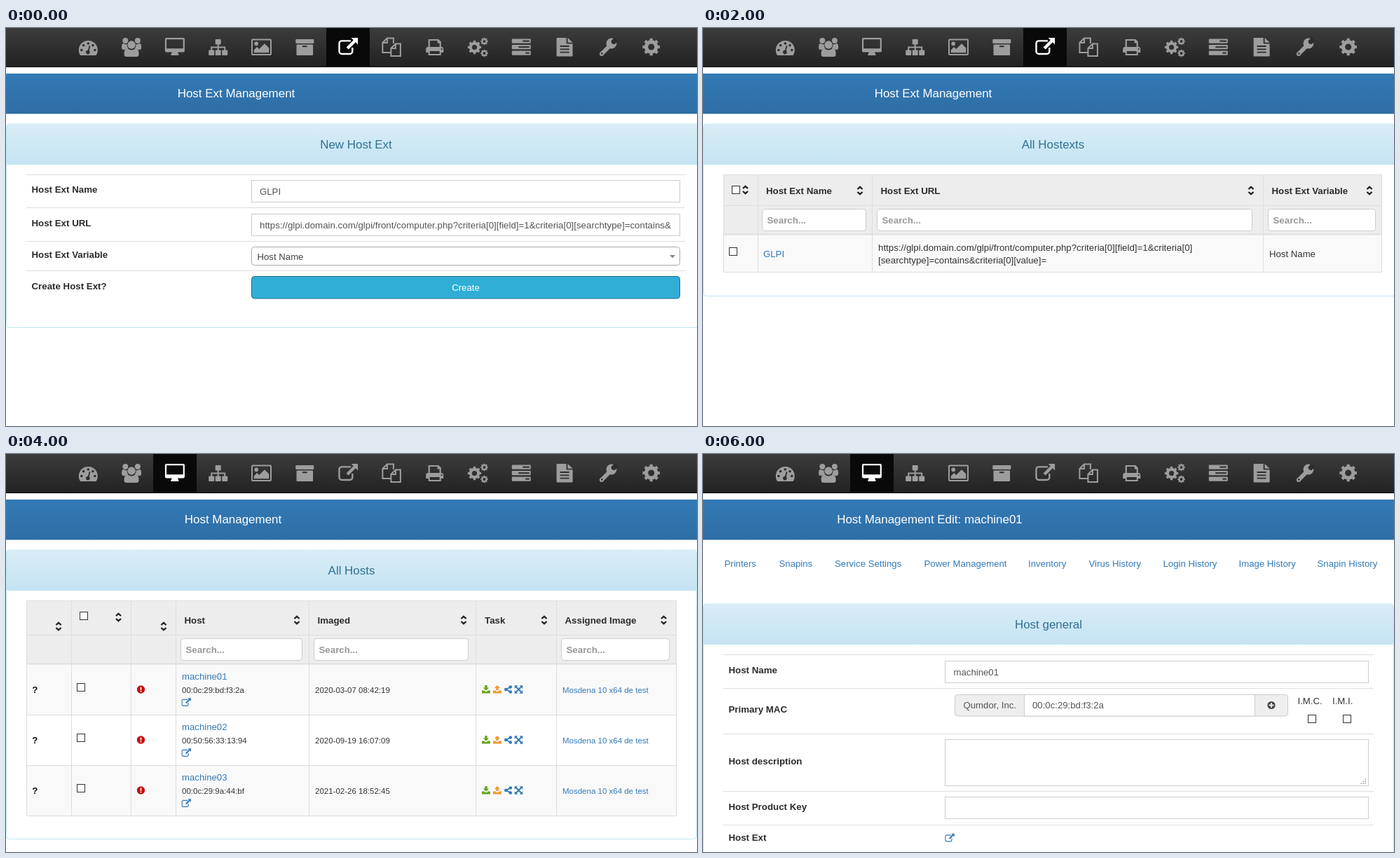
An HTML page that plays this animation: 986x568 px, repeating every 8000 ms.

```html
<!DOCTYPE html>
<html lang="en">
<head>
<meta charset="utf-8">
<title>Host Ext</title>
<style>
html, body { margin: 0; width: 100%; height: 100%; overflow: hidden; background: #fff; }
svg { display: block; width: 986px; height: 568px; font: 13.2px "Liberation Sans", Arial, sans-serif; }
</style>
</head>
<body>
<svg id="stage" viewBox="0 0 986 568"></svg>
<script>
const BLUE = '#337ab7', INK = '#333', DARK = '#2d2d2d';
const URL_HEAD = 'https://glpi.domain.com/glpi/front/computer.php?criteria[0][field]=1&criteria[0]';

const rect = (x, y, w, h, fill, stroke = 'none', r = 0) =>
  `<rect x="${x}" y="${y}" width="${w}" height="${h}" rx="${r}" fill="${fill}" stroke="${stroke}"/>`;
const path = (d, attrs = 'fill="currentColor"') => `<path d="${d}" ${attrs}/>`;
const line = (d, w = 2, color = 'currentColor') =>
  path(d, `fill="none" stroke="${color}" stroke-width="${w}"`);
const dot = (x, y, r, fill = 'currentColor') => `<circle cx="${x}" cy="${y}" r="${r}" fill="${fill}"/>`;
const text = (x, y, s, fill = INK, attrs = '') =>
  `<text x="${x}" y="${y}" fill="${fill}" ${attrs}>${s.replace(/&/g, '&amp;')}</text>`;
const bold = (x, y, s, fill = '#2b2b2b') => text(x, y, s, fill, 'font-weight="700" font-size="13.3"');
const small = (x, y, s, fill = INK) => text(x, y, s, fill, 'font-size="11.5"');
const title = (x, y, s, fill) => text(x, y, s, fill, 'font-size="16.95" text-anchor="middle"');
const place = (x, y, color, body, scale = 1) =>
  `<g transform="translate(${x} ${y}) scale(${scale})" color="${color}">${body}</g>`;
const hLines = (x1, x2, ys, c = '#ddd') => ys.map(y => line(`M${x1} ${y}H${x2}`, 1, c)).join('');
const vLines = (xs, y1, y2, c = '#ddd') => xs.map(x => line(`M${x} ${y1}V${y2}`, 1, c)).join('');

const input = (x, y, w, h = 31, r = 0) => rect(x, y, w, h, '#fff', '#ccc', r);
const search = (x, y, w) => input(x, y, w, 31, 4) + bold(x + 7, y + 20.5, 'Search...', '#999');
const check = (x, y) => rect(x, y, 11, 11, '#fff', '#333');
const sorter = (x, y) => place(x, y, '#222', line('M-3.6-2L0-5.2 3.6-2M-3.6 2L0 5.2 3.6 2', 2.3));

const gear = (x, y, r) => {
  const ring = (k, w, extra = '') =>
    `<circle cx="${x}" cy="${y}" r="${r * k}" fill="none" stroke="currentColor" stroke-width="${r * w}" ${extra}/>`;
  return ring(.59, .44) + ring(.88, .26, 'pathLength="16" stroke-dasharray="1" stroke-dashoffset=".5"');
};
const box = (x, y, w, h, r = 1) => rect(x, y, w, h, 'currentColor', 'none', r);

const link =
  line('M4-8.6H-9a3.6 3.6 0 0 0-3.6 3.6V6.4A3.6 3.6 0 0 0-9 10H2.6a3.6 3.6 0 0 0 3.6-3.6V1', 2.4) +
  path('M4.5-13H14V-3.5L10.8-6.7 .6 3.5-2.5.4 7.7-9.8z');

const icons = [
  path('M-11.2 12A13.5 13.5 0 1 1 11.2 12Z') +
    [[-9.5, 4.5], [-6.7, -2.3], [0, -5], [6.7, -2.3], [9.5, 4.5]].map(p => dot(...p, 1.8, DARK)).join('') +
    line('M0 7L2.2-1.6', 1.8, DARK) + dot(-.4, 7.6, 2.8, DARK),
  [-1, 1].map(s => `<g transform="scale(${s} 1)">${dot(8.8, -9, 4)}${
    path('M14 1c0-4.500-.9-6-2.500-6q-3 2-5.500 1 0 4-2 6 4 0 6 2h1.500q2.500 0 2.500-3z')}</g>`).join('') +
    dot(0, -3, 6.6, DARK) + dot(0, -3, 5.7) +
    path('M-7 14q-3.500 0-3.500-3.500c0-6 2-8.500 4.500-8.500 4 3.300 8 3.300 12 0 2.500 0 4.500 2.500 4.500 8.500q0 3.500-3.500 3.500z'),
  path('M-12-13H12a2 2 0 0 1 2 2V5.500a2 2 0 0 1-2 2H4l1.500 3V12h-11v-1.500l1.500-3h-8a2 2 0 0 1-2-2V-11a2 2 0 0 1 2-2zM-11.800-10.800V2.200H11.800V-10.800z',
    'fill="currentColor" fill-rule="evenodd"'),
  box(-4, -11, 8, 7.5) + [-13.5, -4, 5.5].map(x => box(x, 4.5, 8, 7.5)).join('') +
    line('M0-4V5M-9.500 5V.5H9.500V5'),
  line('M-12.500-10.500H12.500a1 1 0 0 1 1 1V10a1 1 0 0 1-1 1H-12.500a1 1 0 0 1-1-1V-9.500a1 1 0 0 1 1-1z') +
    dot(-7.3, -4.6, 2.8) + path('M-10.800 8.300V4.500l4.500-4.500 3 3L4.500-4.800 10.800 1.500V8.300z'),
  box(-13, -11, 26, 6) + box(-11.8, -3.6, 23.6, 15.6) + rect(-3.5, -1.8, 7, 2, DARK, 'none', 1),
  link,
  line('M-1 8H-12.500V-6L-6-12.500H3V-5M-6-12.500V-6H-12.500M-.5 2L6-4.500H13V13H-.5zM6-4.500V2H-.5'),
  line('M-8 1V-10H5l3 3V1M5-10V-6.500H8', 2.2) + path('M-12.500 8V3a3 3 0 0 1 3-3H9.500a3 3 0 0 1 3 3V8z') +
    `<rect x="-8" y="5" width="16" height="6" fill="${DARK}" stroke="currentColor" stroke-width="2"/>` + dot(10, 3, 1.1, DARK),
  gear(-5, .5, 9.6) + gear(9, -8, 5.3) + gear(9, 9, 5.3),
  [-11.5, -3, 5.5].map((y, i) => box(-13.5, y, 27, 6.3) +
    line(`M${[2, -4, 6][i]} ${y + 3.15}H11.5`, 2, DARK)).join(''),
  path('M-10.500-13H2.500V-5.500a1 1 0 0 0 1 1H11.500V12.500a1 1 0 0 1-1 1H-10.500a1 1 0 0 1-1-1V-12a1 1 0 0 1 1-1zM4.500-13L11.500-6.300H4.500z') +
    line('M-6.500-1H6.500M-6.500 3.300H6.500M-6.500 7.600H6.500', 1.8, DARK),
  line('M-9 10L3-2', 6) + dot(-9, 10, 3) + dot(5, -5, 7.4) +
    path('M4.500-8.500L10-14 15-9 9.500-3.800 5.500-4.800z', `fill="${DARK}"`) + dot(-8.6, 9.4, 1.3, DARK),
  gear(0, 0, 12.2)
];

function page(active, heading, x) {
  const nav = icons.map((icon, i) => {
    const cx = 117.3 + 61.8 * i, on = i === active;
    return (on ? rect(Math.round(cx - 31), 0, 62, 55, '#090909') : '') +
      place(cx, 27, on ? '#fff' : '#9d9d9d', icon);
  }).join('');
  return rect(0, 0, 986, 55, 'url(#nav)') + nav + rect(0, 55, 986, 1, '#080808') +
    rect(0, 65, 986, 57.5, 'url(#bar)') + title(x, 99, heading, '#fff');
}

const panel = (y, bottom, w, cx, name) =>
  rect(.5, y, w, bottom - y, '#fff', '#bce8f1', 4) + rect(1, y + .5, w - 1, 57, 'url(#head)', 'none', 3) +
  hLines(1, w, [y + 57.5], '#bce8f1') + title(cx, y + 34.7, name, '#31708f');

function grid(xs, ys) {
  const [l, r, t, b] = [xs[0], xs.at(-1), ys[0], ys.at(-1)];
  let s = rect(l, t, r - l, ys[2] - t, '#ededed');
  for (let i = 2; i < ys.length - 1; i += 2) s += rect(l, ys[i], r - l, ys[i + 1] - ys[i], '#f9f9f9');
  return s + hLines(l, r, ys) + vLines(xs, t, b) + hLines(l, r, [ys[2] - 1]);
}

function newExt() {
  return page(6, 'Host Ext Management', 328.5) + panel(137, 427.5, 1000, 499.5, 'New Host Ext') +
    hLines(29, 969, [209.5, 256.5, 304.5, 346.5]) +
    bold(36.5, 235, 'Host Ext Name') + bold(36.5, 283, 'Host Ext URL') +
    bold(36.5, 328, 'Host Ext Variable') + bold(36.5, 373, 'Create Host Ext?') +
    input(350.5, 217.5, 611) + text(362, 238, 'GLPI', '#555') +
    input(350.5, 265.5, 611) +
    text(362, 286, URL_HEAD + '[searchtype]=contains&', '#555', 'font-size="13.3"') +
    rect(350.5, 312.5, 611, 26, '#fff', '#aaa', 4) + text(358.5, 331, 'Host Name', '#444') +
    path('M947 324H955L951 328.500z', 'fill="#888"') +
    rect(350.5, 354.5, 611, 31.5, '#30aed6', '#1b6d85', 4) +
    text(656, 375, 'Create', '#fff', 'text-anchor="middle"');
}

function allExts() {
  return page(6, 'Host Ext Management', 328.5) + panel(137, 382.5, 1000, 499.5, 'All Hostexts') +
    grid([29.5, 78.5, 241.5, 799.5, 968.5], [209.5, 253.5, 295, 348.5]) +
    check(41.5, 225.5) + sorter(60.5, 231) + [224, 782, 951].map(x => sorter(x, 232)).join('') +
    bold(90, 237, 'Host Ext Name') + bold(253.5, 237, 'Host Ext URL') + bold(811.5, 237, 'Host Ext Variable') +
    search(84.5, 258.5, 148) + search(248.5, 258.5, 535) + search(806.5, 258.5, 153) +
    check(37.5, 313.5) + text(86, 327, 'GLPI', BLUE) +
    text(250, 317.5, URL_HEAD, INK, 'font-size="13.3"') +
    text(250, 336, '[searchtype]=contains&criteria[0][value]=', INK, 'font-size="13.3"') +
    text(808, 327, 'Host Name');
}

const tray = 'M-6 1.500H-2.500L-1 3H1L2.500 1.500H6V5.500H-6z';
const tasks =
  place(685, 0, '#69a51c', path(tray) + path('M-1.700-6H1.700V-2.500H4.200L0 1.700-4.200-2.500H-1.700z')) +
  place(701, 0, '#ef9a32', path(tray) + path('M-1.700 1V-2H-4.200L0-6 4.200-2H1.700V1z')) +
  place(716.5, 0, BLUE, line('M3.300-3.500L-3 0 3.300 3.500', 1.7) + dot(3.3, -3.5, 2.3) + dot(-3.2, 0, 2.3) + dot(3.3, 3.5, 2.3)) +
  place(731.5, 0, BLUE, line('M-4-4L4 4M4-4L-4 4', 2) +
    path('M-5.800-5.800h4.500l-4.500 4.500zM5.800-5.800h-4.500l4.500 4.500zM-5.800 5.800h4.500l-4.500-4.500zM5.800 5.800h-4.500l4.500-4.500z'));

function allHosts() {
  const hosts = [
    ['machine01', '00:0c:29:bd:f3:2a', '2020-03-07 08:42:19'],
    ['machine02', '00:50:56:33:13:94', '2020-09-19 16:07:09'],
    ['machine03', '00:0c:29:9a:44:bf', '2021-02-26 18:52:45']
  ];
  const row = ([name, mac, date], i) => place(0, 336 + 72 * i, INK,
    bold(37.3, 4.8, '?', '#111') + check(101.5, -8.5) + dot(192.5, 0, 5.7, '#c70d0d') +
    line('M192.500-3.600V.8M192.500 1.800V3.600', 1.8, '#fff') +
    text(251, -14, name, BLUE) + small(251, 4.7, mac) + place(257.2, 18.5, BLUE, link, .48) +
    small(441, 4.7, date) + tasks + small(794, 4.7, 'Mosdena 10 x64 de test', BLUE));
  return page(2, 'Host Management', 324) + panel(137, 549.5, 985, 493, 'All Hosts') +
    grid([29.5, 93.5, 178.5, 242.5, 432.5, 670.5, 785.5, 956.5], [209.5, 258.5, 300, 372.5, 444.5, 516.5]) +
    check(105.5, 225.5) + sorter(75, 246) + sorter(160.5, 233) + sorter(225, 246) +
    [415, 653, 768, 938.5].map(x => sorter(x, 237)).join('') +
    bold(254.5, 242, 'Host') + bold(444.5, 242, 'Imaged') + bold(683, 242, 'Task') + bold(797.5, 242, 'Assigned Image') +
    search(249.5, 263.5, 173) + search(439.5, 263.5, 220) + search(792.5, 263.5, 154) +
    hosts.map(row).join('');
}

function editHost() {
  const tabs = [[30.5, 'Printers'], [108.5, 'Snapins'], [188, 'Service Settings'], [315.5, 'Power Management'],
    [464, 'Inventory'], [550.5, 'Virus History'], [656.5, 'Login History'], [764.5, 'Image History'], [876.5, 'Snapin History']];
  const labels = [[313, 'Host Name'], [369, 'Primary MAC'], [443, 'Host description'],
    [507.5, 'Host Product Key'], [551.5, 'Host Ext']];
  return page(2, 'Host Management Edit: machine01', 323.5) +
    tabs.map(([x, s]) => text(x, 161, s, BLUE)).join('') +
    panel(214, 600, 985, 493, 'Host general') +
    hLines(29, 957, [286.5, 334.5, 399.5, 481.5, 529.5]) +
    labels.map(([y, s]) => bold(36.5, y, s)).join('') +
    input(345.5, 295.5, 604) + text(357.5, 315.5, 'machine01', '#555') +
    rect(359.5, 343.5, 475, 30.5, '#eee', '#ccc', 4) + input(458.5, 343.5, 329, 30.5) +
    text(371.5, 363, 'Qumdor, Inc.', '#555') + text(470, 363, '00:0c:29:bd:f3:2a', '#555') +
    dot(811, 358.5, 5.6, '#444') + line('M807.500 358.500H814.500M811 355V362', 1.8, '#eee') +
    text(848.5, 357, 'I.M.C.') + text(898, 357, 'I.M.I.') + check(863.5, 372.5) + check(913.5, 372.5) +
    input(345.5, 407.5, 604, 66) +
    [[945, 464], [942, 467], [945, 467], [939, 470], [942, 470], [945, 470]].map(([x, y]) => rect(x - .5, y - .5, 1.5, 1.5, '#999')).join('') +
    input(345.5, 489.5, 604) + place(352, 548, BLUE, link, .48);
}

const fade = (id, a, b) => `<linearGradient id="${id}" x2="0" y2="1"><stop stop-color="${a}"/><stop offset="1" stop-color="${b}"/></linearGradient>`;
const stage = document.getElementById('stage');
stage.innerHTML = `<defs>${fade('nav', '#3c3c3c', '#222')}${fade('bar', '#337ab7', '#2e6da4')}${fade('head', '#d9edf7', '#c4e3f3')}</defs>` +
  [newExt, allExts, allHosts, editHost].map(scene => `<g class="scene">${scene()}</g>`).join('');
const scenes = stage.querySelectorAll('.scene');

function draw() {
  const now = Math.floor(performance.now() / 2000) % 4;
  scenes.forEach((g, i) => g.style.display = i === now ? '' : 'none');
  requestAnimationFrame(draw);
}
draw();
</script>
</body>
</html>
```
